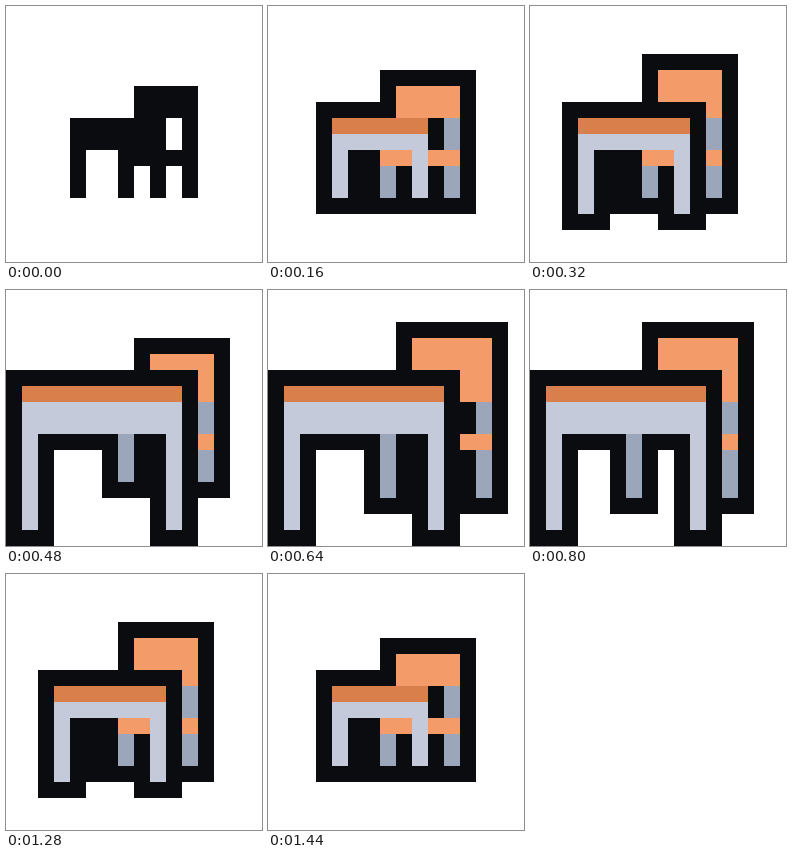
An HTML page that plays this animation: 256x256 px, repeating every 1600 ms.

```html
<!DOCTYPE html>
<html lang="en">
<head>
<meta charset="utf-8">
<title>Table and chair</title>
<style>
  :root {
    --ink: #0a0c10;
    --wood: #f39c69;
    --top: #d97f4b;
    --light: #c4cad9;
    --steel: #9ca6bb;
  }
  html, body { margin: 0; width: 100%; height: 100%; overflow: hidden; background: #fff; }
  svg { display: block; width: 100%; height: 100%; shape-rendering: crispEdges; }

  .ink { fill: var(--ink); }
  .wood { fill: var(--wood); }
  .top { fill: var(--top); }
  .light { fill: var(--light); }
  .steel { fill: var(--steel); }
  .flat { --wood: var(--ink); --top: var(--ink); --light: var(--ink); --steel: var(--ink); }

  .pose { visibility: hidden; animation: 1.6s step-end infinite; }
  #flat { animation-name: flat; }
  #small { animation-name: small; }
  #medium { animation-name: medium; }
  #land { animation-name: land; }
  #stretch { animation-name: stretch; }
  #rest { animation-name: rest; }
  #table { animation-name: table; }

  @keyframes flat { 0% { visibility: visible } 10%, 100% { visibility: hidden } }
  @keyframes small { 0%, 20% { visibility: hidden } 10%, 90%, 100% { visibility: visible } }
  @keyframes medium { 0%, 30%, 90%, 100% { visibility: hidden } 20%, 80% { visibility: visible } }
  @keyframes land { 0%, 40%, 100% { visibility: hidden } 30% { visibility: visible } }
  @keyframes stretch { 0%, 50%, 100% { visibility: hidden } 40% { visibility: visible } }
  @keyframes rest { 0%, 80%, 100% { visibility: hidden } 50% { visibility: visible } }
  @keyframes table { 0%, 80%, 100% { visibility: hidden } 30% { visibility: visible } }
</style>
</head>
<body>
<!-- One unit is one pixel of a 16 by 16 sprite -->
<svg viewBox="0 0 16 16">
  <defs>
    <g id="set">
      <path class="steel" d="M11 7h1v5h-1z M7 9h1v3h-1z"/>
      <path class="wood" d="M8 5h4v2h-4z M7 9h5v1h-5z"/>
      <path class="top" d="M4 7h6v1h-6z"/>
      <path class="light" d="M4 8h6v4h-1v-3h-4v3h-1z"/>
    </g>
  </defs>

  <g id="flat" class="pose flat"><use href="#set"/></g>

  <g id="small" class="pose">
    <path class="ink" d="M7 4h6v9H3V6h4z"/>
    <use href="#set"/>
  </g>

  <g id="medium" class="pose">
    <path class="ink" d="M7 3h6v10h-2v1h-3v-1h-3v1h-3v-8h5z"/>
    <path class="steel" d="M11 7h1v5h-1z M7 10h1v2h-1z"/>
    <path class="wood" d="M8 4h4v3h-1v-1h-3z M7 9h2v1h-2z M11 9h1v1h-1z"/>
    <path class="top" d="M3 7h7v1h-7z"/>
    <path class="light" d="M3 8h7v5h-1v-4h-5v4h-1z"/>
  </g>

  <g id="table" class="pose">
    <path class="ink" d="M0 5h12v11h-3v-6h-6v6h-3z"/>
    <path class="top" d="M1 6h10v1h-10z"/>
    <path class="light" d="M1 7h10v8h-1v-6h-8v6h-1z"/>
  </g>

  <!-- Only the parts of the chair that show around the table -->
  <g id="land" class="pose">
    <path class="ink" d="M8 3h6v10h-3v-8h-3z M6 9h3v4h-3z"/>
    <path class="light" d="M10 9h1v6h-1z"/>
    <path class="steel" d="M12 7h1v5h-1z M7 9h1v3h-1z"/>
    <path class="wood" d="M9 4h4v3h-1v-2h-3z M12 9h1v1h-1z"/>
  </g>

  <g id="stretch" class="pose">
    <path class="ink" d="M8 2h7v12h-4v-9h-3z M6 9h3v5h-3z"/>
    <path class="steel" d="M13 7h1v6h-1z M7 9h1v4h-1z"/>
    <path class="wood" d="M9 3h5v4h-2v-2h-3z M12 9h2v1h-2z"/>
  </g>

  <g id="rest" class="pose">
    <path class="ink" d="M7 2h7v12h-3v-9h-4z M5 9h3v5h-3z"/>
    <path class="steel" d="M12 7h1v6h-1z M6 9h1v4h-1z"/>
    <path class="wood" d="M8 3h5v4h-1v-2h-4z M12 9h1v1h-1z"/>
  </g>
</svg>
</body>
</html>
```
